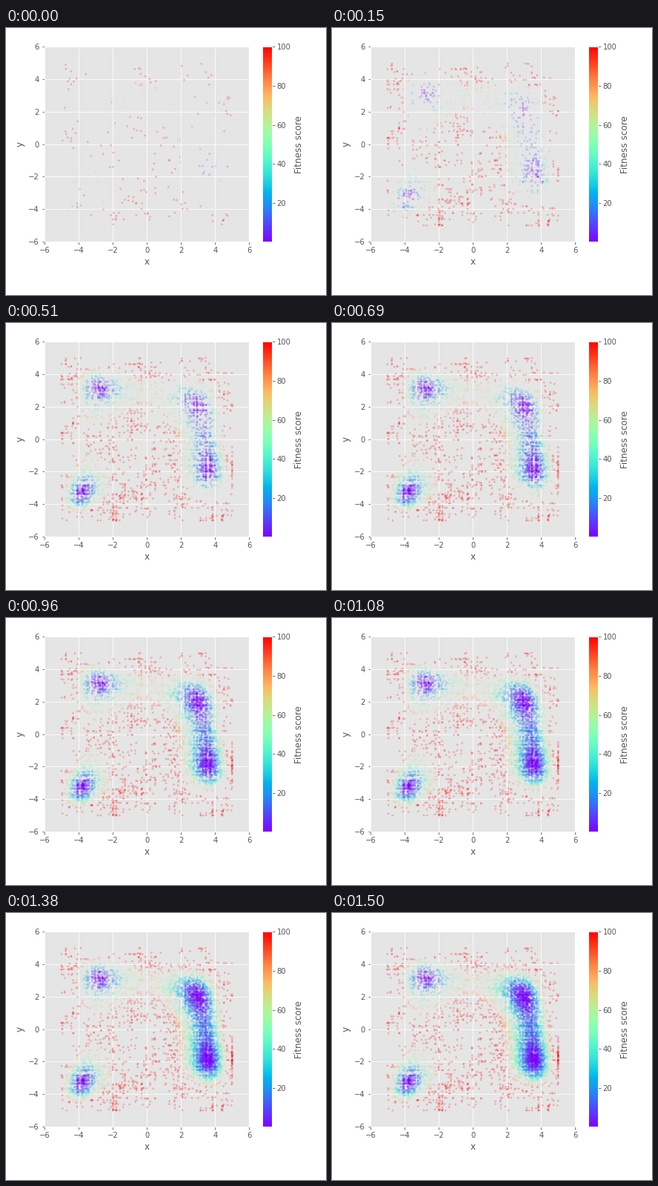
Recreate the animation shown at these times as a matplotlib script. Size 432 by 360 pixels, loop 1530 ms.

```python
import numpy as np
import matplotlib.pyplot as plt
from matplotlib.animation import FuncAnimation
from matplotlib.cm import ScalarMappable
from matplotlib.colors import Normalize

W, H, DPI = 432, 360, 72
FRAMES, STEP_MS = 51, 30
LIMIT = 5.0

# Where the first generation gathers
CLUMPS = [
    (-4.4, 4.0), (-4.3, 0.3), (-2.7, -0.9), (-4.2, -3.8), (-1.9, -4.0),
    (-0.4, -4.2), (-0.9, -2.6), (-0.3, 1.1), (-0.3, 4.3), (1.6, 0.8),
    (1.2, -1.0), (1.8, -3.4), (3.7, -1.3), (4.6, -4.4), (4.6, 2.7), (2.9, 4.3),
]

rng = np.random.default_rng(7)
genes = rng.uniform(-LIMIT, LIMIT, (2, 150))


def fitness(p):
    x, y = p[..., 0], p[..., 1]
    return (x**2 + y - 11) ** 2 + (x + y**2 - 7) ** 2


def inherit(p, chance):
    """Swap coordinates for the nearest shared gene, which lines points up."""
    p = p.copy()
    for axis in (0, 1):
        near = np.abs(p[:, axis, None] - genes[axis]).argmin(axis=1)
        swap = rng.random(len(p)) < chance
        p[swap, axis] = genes[axis][near[swap]]
    return np.clip(p, -LIMIT, LIMIT)


def first_generation():
    clumped = np.repeat(CLUMPS, 9, axis=0)
    clumped += rng.normal(0, 0.55, clumped.shape)
    spread = rng.uniform(-LIMIT, LIMIT, (56, 2))
    p = np.vstack([clumped, spread])
    return p[np.abs(p).max(axis=1) < 4.95]


def wanderers(parents, n):
    """Children that keep one parent coordinate and shift the other."""
    kids = parents[rng.integers(len(parents), size=n)].copy()
    axis = rng.integers(2, size=n)
    kids[np.arange(n), axis] += rng.normal(0, 0.6, n)
    return inherit(kids, 0.3)


def settlers(n, k):
    """Points drawn towards the four minima; the left ones die out."""
    p = rng.uniform(-LIMIT, LIMIT, (n * 60, 2))
    x, y = p.T
    f = fitness(p)
    keep = 0.25 * np.exp(-f / 8) + 0.13 * np.exp(-f / 35)
    left = np.exp(-max(0, k - 17) / 4) * np.where(y < 0, 2, 1.2)
    lower = 1.2 + 0.8 * np.exp(-k / 25)
    keep *= np.where(x < 0, left, np.where(y < 0.3, lower, 1))
    p = p[rng.random(len(p)) < keep][:n]
    return inherit(p, 0.65 if k < 18 else 0.25)


def edge_points(n):
    return np.column_stack([np.full(n, LIMIT), rng.normal(-1.9, 0.65, n)])


def evolve():
    points = [first_generation()]
    for k in range(1, FRAMES):
        parents = np.vstack(points[:3])
        points.append(np.vstack([
            wanderers(parents, int(220 * np.exp(-k / 4.5))),
            settlers(min(25 + 8 * k, 115), k),
            edge_points(1),
        ]))
    return np.vstack(points), np.cumsum([len(p) for p in points])


points, counts = evolve()
scores = fitness(points)

plt.style.use("ggplot")
fig = plt.figure(figsize=(W / DPI, H / DPI), dpi=DPI, facecolor="white")
ax = fig.add_axes([0.12, 0.2, 0.8, 0.73])
ax.set(xlim=(-6, 6), ylim=(-6, 6), xlabel="x", ylabel="y")
ax.set_xticks(range(-6, 7, 2))
ax.set_yticks(range(-6, 7, 2))

norm = Normalize(0.3, 100)
dots = ax.scatter([], [], c=[], s=5, cmap="rainbow", norm=norm, alpha=0.2)

bar = fig.colorbar(ScalarMappable(norm, "rainbow"), ax=ax, pad=0.05)
bar.set_ticks(range(20, 101, 20))
bar.set_label("Fitness score")


def update(k):
    n = counts[k]
    dots.set_offsets(points[:n])
    dots.set_array(scores[:n])
    return (dots,)


anim = FuncAnimation(fig, update, frames=FRAMES, interval=STEP_MS,
                     repeat=True, repeat_delay=0, blit=False)
plt.show()
```
